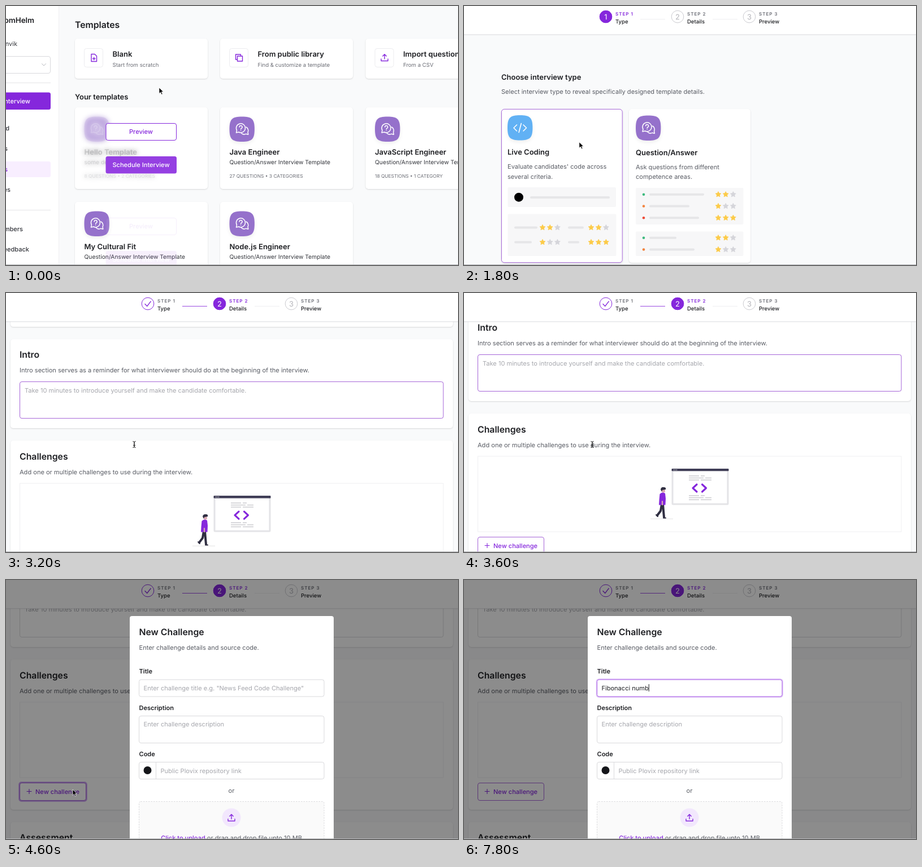
Write an HTML page that moves like this. It is 800 by 460 pixels and loops after 8000 ms.

```html
<!DOCTYPE html>
<html lang="en">
<head>
<meta charset="utf-8">
<title>Interview template walkthrough</title>
<style>
  html, body { margin: 0; width: 100%; height: 100%; overflow: hidden; background: #f9fafb; }
  svg { display: block; width: 100vw; height: 100vh; font-family: Inter, sans-serif; }
  text { white-space: pre; text-rendering: geometricPrecision; }
  .card { fill: #fff; filter: drop-shadow(0 1px 1.2px #0002); }
  .badge { filter: drop-shadow(0 3px 3px #0001); }
  .line { fill: none; stroke-linecap: round; stroke-linejoin: round; }
</style>
</head>
<body>
<svg id="stage" viewBox="0 0 800 460"></svg>
<script>
const PURPLE = '#8527dc', INK = '#1d1e22', BODY = '#595c64', HINT = '#a6a7ad', BORDER = '#d9d9dc';
const BLUE = '#61b1f4', VIOLET = '#9571cb', OUTLINE = '#a564d8', LOOP = 8000;
const BODY_SIZE = 11.06, TITLE_SIZE = 13;

// Drawing helpers
const text = (x, y, str, size = BODY_SIZE, fill = BODY, weight = 400, extra = '') =>
  `<text x="${x}" y="${y}" font-size="${size}" fill="${fill}" font-weight="${weight}" ${extra}>${str}</text>`;
const centered = (x, y, str, size, fill, weight = 500) => text(x, y, str, size, fill, weight, 'text-anchor="middle"');
const ending = (x, y, str, size, fill, weight = 400) => text(x, y, str, size, fill, weight, 'text-anchor="end"');
const heading = (x, y, str, size = 15.8) => text(x, y, str, size, INK, 600);
const title = (x, y, str) => heading(x, y, str, TITLE_SIZE);
const label = (x, y, str) => heading(x, y, str, BODY_SIZE);
const hint = (x, y, str, extra) => text(x, y, str, BODY_SIZE, HINT, 400, extra);
const rect = (x, y, w, h, fill, r = 0, extra = '') =>
  `<rect x="${x}" y="${y}" width="${w}" height="${h}" rx="${r}" fill="${fill}" ${extra}/>`;
const card = (x, y, w, h) => rect(x, y, w, h, '#fff', 5, 'class="card"');
const box = (x, y, w, h, stroke = BORDER, extra = '') => rect(x, y, w, h, '#fff', 3.5, `stroke="${stroke}" ${extra}`);
const circle = (x, y, r, fill, extra = '') => `<circle cx="${x}" cy="${y}" r="${r}" fill="${fill}" ${extra}/>`;
const line = (d, stroke, width = 1.3) => `<path class="line" d="${d}" stroke="${stroke}" stroke-width="${width}"/>`;
const at = (x, y, content) => `<g transform="translate(${x} ${y})">${content}</g>`;
const group = (id, content) => `<g id="${id}">${content}</g>`;

const uploadIcon = line('M-6 2v3.5h12V2M0 2v-8M-3.2-3 0-6.2 3.2-3', PURPLE, 1.4);
const plusIcon = line('M-4 0h8M0-4v8', PURPLE, 1.1);
const badge = (x, y, fill, glyph) => at(x, y,
  `<path class="badge" fill="${fill}" d="M0 22.2C0 4.5 4.5 0 22.2 0S44.4 4.5 44.4 22.2 39.9 44.4 22.2 44.4 0 39.9 0 22.2"/>` + glyph);
const codeBadge = (x, y) => badge(x, y, BLUE,
  line('M16.5 17l-5.5 5.5 5.5 5.5M28 17l5.5 5.5-5.5 5.5M24.3 14.5l-4.2 16', '#fff', 1.6));
const chatBadge = (x, y) => badge(x, y, VIOLET,
  line('M12 28.5l1-4.2a8 8 0 1 1 3.4 3.2zM29.5 18.5a6.8 6.8 0 0 1 3 9.2l.8 4-4-1a7 7 0 0 1-8.3-1.4', '#fff', 1.5) +
  line('M17.6 18.4a2.5 2.5 0 1 1 3.6 2.3q-1.1.5-1.1 1.7M20.1 24.7v.1', '#fff', 1.5));

const starPoints = Array.from({ length: 10 }, (_, i) => {
  const r = i % 2 ? 2.6 : 5.2, a = i * Math.PI / 5;
  return `${(r * Math.sin(a)).toFixed(2)},${(-r * Math.cos(a)).toFixed(2)}`;
}).join(' ');
const star = color => `<polygon points="${starPoints}" fill="${color}" stroke="${color}" stroke-width=".7" stroke-linejoin="round"/>`;
const stars = (x, y, filled) => [0, 1, 2].map(i =>
  at(x + i * 13.2, y, star(i < filled ? '#fccb48' : '#d5d5da'))).join('');
const bar = (x, y, w) => rect(x, y - 2, w, 4, '#e6e6e8', 2);

// Template list
const actionCard = (x, name, sub, icon) => card(x, 58, 235, 71) +
  rect(x + 16.5, 75.5, 33, 33, '#fff', 4, 'stroke="#ececef"') + at(x + 33.5, 92, icon) +
  title(x + 66.5, 90, name) + text(x + 66.5, 108, sub, 9.6, '#6b6d75');
const templateBody = (x, y, name, sub, meta) => chatBadge(x + 16.5, y + 16.5) +
  title(x + 16.5, y + 83.5, name) + text(x + 16.5, y + 101, sub, 10.27, '#34363c') +
  text(x + 16.5, y + 125, meta, 8.4, '#6b6d75');
const qa = 'Question/Answer Interview Template';
const templateCard = (x, y, name, meta) => card(x, y, 235, 145) + templateBody(x, y, name, qa, meta);
const cardActions = y => box(177, y + 28.5, 124.5, 30, PURPLE) + centered(239, y + 47, 'Preview', BODY_SIZE, PURPLE) +
  rect(176.5, y + 87, 125.5, 30.5, '#9540e2', 3.5) + centered(239, y + 106, 'Schedule Interview', BODY_SIZE, '#fff');
const hello = templateBody(122, 180, 'Hello Template', 'some description', '8 QUESTIONS • 2 CATEGORIES');

const sidebar = rect(0, 0, 93.5, 460, '#fff') + rect(93, 0, 1, 460, '#f0f0f2') +
  ending(50, 30, 'omHelm', 13.3, INK, 600) + ending(20, 71, 'nvik', BODY_SIZE, '#34363c') +
  box(-20, 89.5, 98.5, 30) + line('M63.5 102.5l3.5 3.5 3.5-3.5', '#b9bac0', 1) +
  rect(0, 136, 79, 1, '#e4e4e7') + rect(-9, 153.5, 88, 30.5, PURPLE, 3.5) +
  ending(43, 173, 'Interview', BODY_SIZE, '#fff', 500) +
  rect(-9, 276, 88, 28, '#f8eeff', 3.5) + rect(0, 362, 79, 1, '#e4e4e7') +
  [[6, 221, 'd'], [3, 257, 's'], [3, 293.5, 's', PURPLE], [8, 330, 'es'], [30, 400, 'mbers'], [41, 436, 'eedback']]
    .map(([x, y, s, color = '#34363c']) => ending(x, y, s, BODY_SIZE, color, 500)).join('');

const listPage = sidebar + heading(122, 39, 'Templates') +
  actionCard(122, 'Blank', 'Start from scratch', line('M-4.5-6.5H1.5L5-3V6.5H-4.5zM-2 1.5h4.5M.2-.7v4.5', PURPLE, 1.4)) +
  actionCard(379, 'From public library', 'Find &amp; customize a template',
    line('M-3-3H6V6H-3zM-3.5 3H-6V-6H3v2.5', PURPLE, 1.4)) +
  actionCard(636.5, 'Import questions', 'From a CSV', uploadIcon) +
  title(122, 166, 'Your templates') + card(122, 180, 235, 145) +
  group('helloSharp', hello) + group('helloBlur', hello) + group('helloActions', cardActions(180)) +
  templateCard(379, 180, 'Java Engineer', '27 QUESTIONS • 3 CATEGORIES') +
  templateCard(636.5, 180, 'JavaScript Engineer', '18 QUESTIONS • 1 CATEGORY') +
  templateCard(122, 348, 'My Cultural Fit', '') + group('fitActions', cardActions(348)) +
  templateCard(379, 348, 'Node.js Engineer', '');

// Interview type
const typeText = (x, y, name, first, second) => title(x, y, name) +
  text(x, y + 25.3, first) + text(x, y + 42.7, second);
const rated = (y, color, w, filled) => circle(318, y, 2.3, color) + bar(328, y, w) + stars(450, y, filled);
const selection = (id, x) => rect(x, 183.3, 213.8, 272.4, 'none', 5, `id="${id}" stroke="${OUTLINE}"`);
const typePage = rect(0, 0, 800, 460, '#f9fafb') + title(66, 131, 'Choose interview type') +
  text(66, 156, 'Select interview type to reveal specifically designed template details.') +
  card(66, 183, 215, 273) + card(292, 183, 215, 273) + selection('pickCode', 66.4) + selection('pickQa', 292.5) +
  codeBadge(77, 194) + typeText(77, 264, 'Live Coding', 'Evaluate candidates\' code across', 'several criteria.') +
  rect(77.5, 322, 191.5, 35, '#f7f7f8', 2) + circle(97, 339.7, 8, '#000') + bar(117, 340, 141) +
  rect(77.5, 369.5, 192, 74.5, '#f7f7f8', 2) +
  bar(89, 393.5, 41) + stars(139, 393.5, 2) + bar(184, 393.5, 28) + stars(225, 393.5, 2) +
  bar(89, 419.5, 31) + stars(139, 419.5, 1) + bar(184, 419.5, 20) + stars(225, 419.5, 3) +
  chatBadge(304, 194.5) + typeText(304, 264.5, 'Question/Answer', 'Ask questions from different', 'competence areas.') +
  rect(304, 323, 190.5, 65, '#f7f7f8', 2) + rated(334.7, '#3dba7e', 97, 2) + rated(355.5, '#f2843f', 71, 1) +
  rated(376.3, '#ee4a36', 88, 3) +
  rect(304, 400.5, 190.5, 43.5, '#f7f7f8', 2) + rated(411.7, '#3dba7e', 48, 2) + rated(432.5, '#f2843f', 80, 1) +
  group('status', rect(-4, 451, 237, 14, '#ececee', 3) + text(0, 462, 'st.server.in', 9, '#8b8c90'));

// Template details
const snippet = y => [[398, 18], [419, 7], [398, 26], [427, 11], [398, 18], [419, 19]]
  .map(([x, w], i) => rect(x, y + (i >> 1) * 3.7, w, 1.6, '#cfcfd3')).join('');
const illustration = rect(369, 314, 98, 61, '#fff', 1, 'stroke="#e4e4e7" stroke-width="3"') +
  rect(367.5, 312, 101, 4.3, '#3f3d56', 1) + [371.5, 374, 376.5].map(x => circle(x, 314.2, .7, '#fff')).join('') +
  snippet(324) + snippet(359) + line('M412 340l-7 6.5 7 6.5M421.5 340l7 6.5-7 6.5', PURPLE, 3.2) +
  rect(330, 400.7, 40, .8, '#ddd') +
  line('M350 375l-2 12-6 8M352 375l1 12 1 11', '#2f2e41', 4) + line('M340 394l3 3M353 399.5h4', '#2f2e41', 2) +
  `<path d="M346.5 357q5-5 9.5-1l1 9-.5 11.5h-11.5l.5-9z" fill="${PURPLE}"/>` +
  line('M351 370v6', '#d9a7b0', 2.2) + circle(353, 351.5, 3, '#dca9b3') +
  '<path d="M348 349q1-5 6-4 4 0 3 4l-6 1-1 3z" fill="#2f2e41"/>';
const detailsPage = card(8, 75, 783, 161) + heading(24, 108.7, 'Details') +
  text(24, 135, 'Enter template detail information so you can easily discover it among other templates.') +
  codeBadge(730, 92) + text(24.5, 178, '*', 10, '#ee4a4a') + label(31.5, 177.5, 'Title') +
  label(410, 177.5, 'Description') + box(24.5, 188.5, 363.5, 30) + box(410.5, 188.5, 363.5, 30) +
  hint(33, 207, 'e.g. Android') + hint(418.5, 207, 'e.g. Entry-level software engineer') +
  card(8, 258, 783, 158) + heading(24, 291.3, 'Intro') +
  text(24, 317, 'Intro section serves as a reminder for what interviewer should do at the beginning of the interview.') +
  box(24.5, 333.5, 749.5, 65, BORDER, 'id="introField"') +
  hint(33, 352.5, 'Take 10 minutes to introduce yourself and make the candidate comfortable.') +
  at(0, 224, card(8, 214, 783, 267) + heading(24, 247.7, 'Challenges') +
    text(24, 273.5, 'Add one or multiple challenges to use during the interview.') +
    rect(24.5, 290, 749.5, 134, '#fff', 0, 'stroke="#efeff1"') + illustration +
    box(23.5, 432.5, 119, 33, '#c79cf0', 'id="buttonGlow" stroke-width="2.5"') + box(24.5, 433.5, 117, 31, OUTLINE) +
    at(41, 448.5, plusIcon) + text(52, 452.5, 'New challenge', BODY_SIZE, PURPLE, 500)) +
  card(8, 727, 783, 160) + heading(24, 760.3, 'Assessment');

// Step header
const step = (x, n, name) => circle(x, 19, 10.8, '#fff', `id="ring${n}"`) +
  circle(x, 19, 11.1, PURPLE, `id="disc${n}"`) +
  text(x, 23.7, n, 13, '#fff', 400, `id="digit${n}" text-anchor="middle"`) +
  text(x + 17, 17.3, 'STEP ' + n, 8, '#6b6d75', 600, `id="label${n}" letter-spacing="1"`) +
  text(x + 17, 31, name, 9.5, INK, 500);
const header = rect(0, -10, 800, 60, '#fff', 0, 'class="card"') + rect(0, 50, 800, 1, '#e6e7ea') +
  step(251, 1, 'Type') + step(378, 2, 'Details') + step(505, 3, 'Preview') +
  rect(312, 23, 44, 1, '#eeeef0', 0, 'id="link"') + rect(440, 23, 44, 1, '#eeeef0') +
  group('check', line('M246 19.5l3.7 4 6.5-8.5', 'currentColor', 1.3));

// New challenge dialog
const dialog = rect(219, 64, 361, 410, '#fff', 4) + heading(235.5, 97.7, 'New Challenge') +
  text(235.5, 123.5, 'Enter challenge details and source code.') + label(235.5, 166, 'Title') +
  rect(234.5, 176, 329.5, 32, 'none', 4.5, 'id="titleGlow" stroke="#e2c9f8" stroke-width="2"') +
  box(235.5, 177, 327.5, 30, BORDER, 'id="titleField"') + hint(243.5, 195.7, '', 'id="titleText"') +
  rect(0, 185, 1, 13, INK, 0, 'id="caret"') +
  label(235.5, 230.7, 'Description') + box(235.5, 241.5, 327.5, 48) +
  hint(243.5, 260.3, 'Enter challenge description') + label(235.5, 313, 'Code') +
  box(235.5, 323.5, 327.5, 30) + rect(265, 324, 1, 29, BORDER) + circle(250.5, 338, 7, '#15161a') +
  hint(273.5, 342.5, 'Public Plovix repository link') + centered(399, 378, 'or', BODY_SIZE, BODY, 400) +
  rect(235.5, 393.5, 327.5, 100, '#fafafa', 3, `stroke="${BORDER}" stroke-dasharray="2.5 2"`) +
  circle(399, 422, 16.5, '#f2e7fd') + at(399, 422.5, uploadIcon) +
  centered(399, 462, `<tspan fill="${PURPLE}" font-weight="500">Click to upload</tspan> or drag and drop file upto 10 MB`,
    BODY_SIZE, BODY, 400);

const arrow = '<path d="M0 0v10.5l2.5-2.3 1.8 4 1.8-.8-1.8-3.8h3.3z" fill="#000" stroke="#fff" stroke-width=".7"/>';
const beam = line('M-2.2-5.5q2.2 0 2.2 1.5v8q0 1.5-2.2 1.5M2.2-5.5q-2.2 0-2.2 1.5v8q0 1.5 2.2 1.5M-1.5 1.5h3', '#222', 1);

const stage = document.getElementById('stage');
stage.innerHTML = rect(0, 0, 800, 460, '#f9fafb') + group('listPage', listPage) + group('typePage', typePage) +
  group('detailsPage', detailsPage) + group('header', header) + rect(0, 0, 800, 460, '#000', 0, 'id="mask"') +
  group('dialog', dialog) + group('cursor', group('arrow', arrow) + group('beam', beam)) + rect(0, 459, 800, 1, '#b4b5b8');

// Motion
const el = Object.fromEntries([...stage.querySelectorAll('[id]')].map(node => [node.id, node]));
const set = (id, attrs) => Object.entries(attrs).forEach(([key, value]) => el[id].setAttribute(key, value));
const show = (id, amount) => set(id, { opacity: +amount });
const during = (t, from, to) => t >= from && t < to;
const ramp = (t, from, to) => {
  const p = Math.min(1, Math.max(0, (t - from) / (to - from)));
  return p * p * (3 - 2 * p);
};
const path = [[0, 271, 145], [400, 269.5, 110], [1100, 269.5, 110], [1700, 205, 240], [2300, 190, 262],
  [2500, 227, 269], [3800, 227, 269], [4200, 118, 372], [4750, 118, 372], [5450, 330, 192], [LOOP, 330, 192]];
const TYPED = 'Fibonacci number';
const PROMPT = 'Enter challenge title e.g. "News Feed Code Challenge"';
set('helloBlur', { style: 'filter: blur(4px)' });
show('disc3', 0);

function render(t) {
  const onDetails = t >= 2320;
  show('listPage', t < 750);
  show('typePage', during(t, 750, 2320));
  show('detailsPage', onDetails);
  show('header', t >= 750);

  const hover = 1 - ramp(t, 0, 400);
  show('helloSharp', 1 - .82 * hover);
  show('helloBlur', .5 * hover);
  show('helloActions', hover);
  show('fitActions', .07 * hover);

  const codePicked = ramp(t, 1500, 1750);
  show('pickCode', codePicked);
  show('pickQa', 1 - codePicked);
  show('status', .6 * (1 - ramp(t, 800, 1200)));

  const advance = onDetails ? .25 + .75 * ramp(t, 2400, 2650) : 0;
  show('disc1', 1 - advance);
  show('disc2', advance);
  [1, 2, 3].forEach(n => {
    const active = n === (onDetails ? 2 : 1), reached = active || n === 1;
    set('ring' + n, { stroke: reached ? PURPLE : '#cbcbd0' });
    set('digit' + n, { fill: active ? '#fff' : '#b4b4ba' });
    set('label' + n, { fill: active ? PURPLE : '#6b6d75' });
  });
  show('digit1', !onDetails);
  show('check', onDetails);
  set('check', { color: advance < .5 ? '#fff' : PURPLE });
  set('link', { fill: onDetails ? '#9a4ae0' : '#eeeef0' });

  const scroll = 224 * ramp(t, 2500, 3500) + 73 * ramp(t, 3620, 4000);
  set('detailsPage', { transform: `translate(0 ${-scroll})` });
  set('introField', { stroke: during(t, 2900, 3750) ? OUTLINE : BORDER });
  show('buttonGlow', during(t, 4150, 5000));

  const open = ramp(t, 4300, 4560), zoom = .7 + .3 * open;
  show('mask', .45 * open);
  set('dialog', { opacity: open, transform: `translate(${118 * (1 - zoom)} ${372 * (1 - zoom)}) scale(${zoom})` });

  const focused = t >= 5500;
  const typed = TYPED.slice(0, Math.max(0, Math.round(4 + (t - 6400) / 140)));
  show('titleGlow', focused);
  set('titleField', { stroke: focused ? '#a95fe6' : BORDER });
  set('titleText', { fill: typed ? INK : HINT });
  el.titleText.textContent = typed || PROMPT;
  show('caret', focused);
  set('caret', { x: 243.5 + (typed ? el.titleText.getComputedTextLength() : 0) });

  const next = path.findIndex(([time]) => time > t);
  const [t0, x0, y0] = path[next - 1], [t1, x1, y1] = path[next], p = ramp(t, t0, t1);
  const overText = during(t, 2500, 3850) || t >= 5300;
  set('cursor', { transform: `translate(${x0 + (x1 - x0) * p} ${y0 + (y1 - y0) * p})` });
  show('cursor', t < 5850 && !during(t, 2320, 2500));
  show('arrow', !overText);
  show('beam', overText);
}

function tick() {
  render(performance.now() % LOOP);
  requestAnimationFrame(tick);
}
tick();
</script>
</body>
</html>
```
